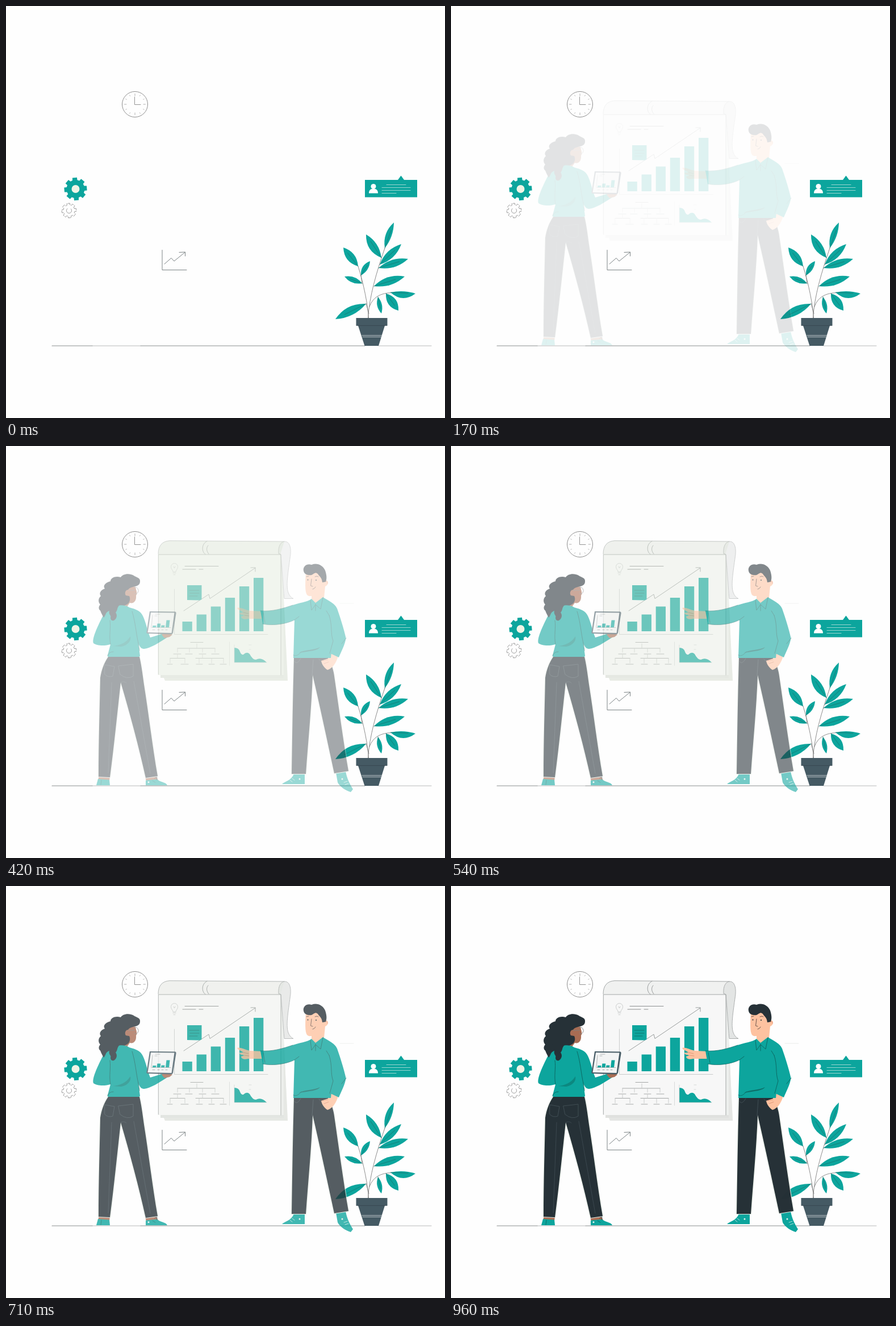
An HTML page with a canvas that plays this animation: 773 by 725 pixels, repeating every 1 s.

```html
<!DOCTYPE html>
<html lang="en">
<head>
<meta charset="utf-8">
<title>Team presentation</title>
<style>
html, body { margin: 0; width: 100%; height: 100%; overflow: hidden; background: #fefefe; }
canvas { display: block; }
</style>
</head>
<body>
<canvas id="stage" width="773" height="725"></canvas>
<script>
const W = 773, H = 725, LOOP = 1000, STEPS = 24;
const TEAL = '#0ca59d', DARK = '#253036', SLATE = '#455a64', GREY = '#8c8f90', PALE = '#c4c7c7';
const TAN = '#fec2a0', BROWN = '#a86b52', HALO = '#e2eae1', FOLD = '#0b625d';

const view = document.getElementById('stage').getContext('2d');
let g;

function layer(paint) {
  const c = document.createElement('canvas');
  c.width = W;
  c.height = H;
  g = c.getContext('2d');
  g.lineJoin = g.lineCap = 'round';
  paint();
  return c;
}
function fill(d, color) {
  g.fillStyle = color;
  g.fill(new Path2D(d));
}
function line(d, color = GREY, width = 1) {
  g.strokeStyle = color;
  g.lineWidth = width;
  g.stroke(new Path2D(d));
}
function dot(x, y, r, color) {
  g.fillStyle = color;
  g.beginPath();
  g.arc(x, y, r, 0, 7);
  g.fill();
}
function rect(x, y, w, h, color) {
  g.fillStyle = color;
  g.fillRect(x, y, w, h);
}
function dashes(y, spans, color, width) {
  for (const [a, b] of spans) line(`M${a} ${y}H${b}`, color, width);
}

function clock() {
  const x = 227, y = 173;
  line(`M${x - 22.5} ${y}a22.5 22.5 0 1 0 45 0a22.5 22.5 0 1 0 -45 0`, '#8e8e8e', 1);
  for (let k = 0; k < 12; k++) {
    const a = k * Math.PI / 6, c = Math.cos(a), s = Math.sin(a), r = k % 3 ? 17 : 15;
    line(`M${x + c * r} ${y + s * r}L${x + c * 18.5} ${y + s * 18.5}`, '#a0a0a0', 0.8);
  }
  line('M226.5 160V173.5H237', '#888', 0.9);
}

function gearPath(x, y, outer, inner, turn) {
  let d = '';
  for (let k = 0; k < 8; k++) {
    const parts = [[-0.27, inner], [-0.2, outer], [0.2, outer], [0.27, inner]];
    for (const [da, r] of parts) {
      const a = turn + k * Math.PI / 4 + da;
      d += `${d ? 'L' : 'M'}${x + r * Math.cos(a)} ${y + r * Math.sin(a)}`;
    }
  }
  return d + 'Z';
}
function gears() {
  fill(gearPath(122.5, 322, 20.3, 16, -0.08), TEAL);
  dot(122.5, 322, 7, '#f0f4e6');
  g.setLineDash([6, 2]);
  line(gearPath(111, 360, 13, 10, -0.1), '#929292', 0.9);
  g.setLineDash([]);
  line('M108 356.5a4.6 4.6 0 1 0 6.5 0.5', '#929292', 0.9);
}

function card() {
  fill('M632 306H690L695.5 298.5L701 306H724V336.5H632Z', TEAL);
  dot(647, 317.5, 4.5, '#fff');
  fill('M639 329.5C639 324 642 321.5 647 321.5S655 324 655 329.5Z', '#fff');
  const rows = [[670, 704, 314.5], [662, 712, 319.5], [662, 712, 324.5], [662, 687, 329.5]];
  for (const [a, b, y] of rows) line(`M${a} ${y}H${b}`, '#a9dcd6', 0.9);
}

// Base point, tip, and how far the left and right edges bow out.
const LEAVES = [
  [667, 426, 683, 381, 13, 8], [661, 443, 634, 402, 17, 12], [620, 458, 594, 425, 15, 14],
  [625, 474, 641, 449, 11, 8], [658, 455, 696, 419, 13, 13], [656, 461, 708, 445, 13, 13],
  [648, 493, 702, 476, 15, 13], [627, 488, 596, 476, 10, 10], [677, 504, 721, 506, 6, 18],
  [669, 506, 691, 536, 15, 15], [655, 512, 661, 541, 8, 9], [634, 524, 580, 551, 13, 17]
];
function plant() {
  line('M638.5 549C637 525 630 490 620 458M627 488L625 474', '#808080', 0.9);
  line('M637.5 549C640 510 652 470 667 426M640 529C646 513 658 505 680 504.5M634 524L639 541', '#808080', 0.9);
  for (const [x, y, tx, ty, l, r] of LEAVES) {
    const dx = tx - x, dy = ty - y, n = Math.hypot(dx, dy), mx = x + dx / 2, my = y + dy / 2;
    const nx = -dy / n, ny = dx / n;
    fill(`M${x} ${y}Q${mx - nx * l} ${my - ny * l} ${tx} ${ty}Q${mx + nx * r} ${my + ny * r} ${x} ${y}Z`, TEAL);
    line(`M${x} ${y}L${x + dx * 0.7} ${y + dy * 0.7}`, '#1c6f6a', 0.7);
  }
  fill('M619.5 561H667.5L656 598H631.5Z', SLATE);
  rect(616.5, 549, 55, 13, SLATE);
  line('M617 562.3H671', '#37474f', 0.9);
  line('M627 579.7H662M628 582.3H661', '#c9d0d2', 0.9);
}

function scenery() {
  rect(0, 0, W, H, '#fefefe');
  dashes(598, [[81, 152], [237, 632]], '#8c8f8f', 1.1);
  dashes(598, [[152, 237], [656, 749]], '#b8baba', 1);
  clock();
  gears();
  line('M275 429.5V464.5H318', '#7c8385', 1);
  line('M279 454L291 443.5L296 449L315 433.5M305 433.5L315.5 433V440', '#7c8385', 1);
  card();
  plant();
}

const SHEET = 'M268 190H484L489 268V403H268Z';
const ROLL = 'M268 191Q268 168 288 166.5L490 168L483 191Z';
const BACK = 'M484 200L489 268L496 413H280L278 408H272V402H484Z';
const CURL = 'M480 189C479 176 484 168 491 168C499 168 502 178 501 190C498 215 492 245 497 258Q500 266 506 268.5H490C488 245 486 215 484 191Z';

function paper() {
  for (const d of [BACK, SHEET, ROLL]) fill(d, '#edf3e8');
}

function orgChart() {
  const c = '#9b9e9e', w = 0.9;
  dashes(345.5, [[325, 347]], c, w);
  dashes(356, [[302, 368]], c, w);
  dashes(366, [[295, 308], [316, 328], [340, 352], [362, 375]], c, w);
  dashes(373.5, [[289, 315], [334, 383]], c, w);
  dashes(384, [[284, 293], [308, 321], [335, 346], [357, 367], [377, 388]], c, w);
  line('M336 348V356M302 356V363M323 356V363M346 356V363M368 356V363', PALE, w);
  line('M302 367V373M346 367V373M289 374V382M315 374V382M340 374V382M362 374V382M383 374V382', PALE, w);
}

function board() {
  fill(BACK, '#e5e6e4');
  rect(272, 402, 217, 6, '#e0e1df');
  fill('M268 190H484.5V403H268Z', '#f8f8f8');
  fill('M484 191L489 268V403H484Z', '#eeefee');
  fill(ROLL, '#f1f1f1');
  fill(CURL, '#e3e5e4');
  line('M268.3 402V191H484V403', '#979b9b', 0.9);
  line('M268 190Q268 168 288 166.7L490 168', '#979b9b', 0.9);
  line(CURL, '#a3a6a6', 0.9);
  line('M354 167.5C344 172 344 186 351 190.5M357 190C352 184 353 178 356 175', '#8c9090', 0.9);

  line('M294 221C294 218 290.5 217 290.5 212.5a6 6 0 0 1 12 0C302.5 217 299 218 299 221ZM294 223.5H299M295 226.5H298M295 212L296.5 215L298 212', PALE, 0.9);
  line('M315 211.5H374M311 217H334M340 217H347', GREY, 1);
  line('M313 290L357 261L359 268.5L439 214.5M431 214H439V221', '#8c9090', 0.9);
  fill('M319 245H344.5V270L341 271.5L319 271Z', TEAL);
  dashes(254, [[323, 340]], FOLD, 0.7);
  dashes(259, [[324, 340]], FOLD, 0.7);
  dashes(264, [[323, 337]], FOLD, 0.7);

  line('M296.5 252V331.5H461', PALE, 0.9);
  [309, 296.5, 282.5, 267, 247, 232].forEach((y, k) => rect(310.5 + k * 25.1, y, 17.3, 326 - y, TEAL));

  orgChart();
  line('M393.5 345V386', '#d4d6d6', 0.9);
  fill('M402 355Q410 355 412 362Q414 368 418 367Q424 361 429 366Q434 376 440 376Q450 371 459 381H402Z', TEAL);
  line('M402 350V381H459M428 350H432M428 358H431', PALE, 0.7);
}

function trousers(d) {
  line(d, HALO, 2);
  fill(d, DARK);
}

function woman() {
  // Feet and legs
  fill('M164 580L183 582L182 589L162 588Z', BROWN);
  fill('M245 582L264 580L268 588L247 590Z', BROWN);
  fill('M162 586L182 587.5L183 597H159Z', TEAL);
  fill('M246 588.5L266 586.5C272 592 282 591.5 284 597H246Z', TEAL);
  dot(251, 591.5, 1.5, '#e8f3f1');
  line('M262 585Q268 578 265 587', DARK, 0.9);
  line('M168 588L167 596M258 589L263 592', FOLD, 0.8);
  trousers('M180 371H235C238 383 240 398 243 420C251 470 258 530 267 581L246 584C234 530 218 470 202 416C196 470 190 530 183 583L163 582C163 520 165 460 166 408C168 395 172 383 180 371Z');
  line('M174 385L191 388L188 405Q180 408 174 402ZM198 387L224 384V405Q213 412 201 402Z', '#46535a', 0.8);
  line('M186 416L180 575M225 414L254 576M202 416Q208 413 212 417', '#3f4c53', 0.8);

  // Head
  fill('M208 250C216 246 224 247 228 248C229 254 232 260 229 263C230 272 225 278 218 276L213 283L205 279Z', BROWN);
  fill('M236 239C237 231 228 231 225 228C217 223 205 225 202 231C193 228 184 232 184 238C175 240 170 246 174 251C167 253 163 259 167 264C162 268 162 275 166 279C161 284 164 291 170 291C173 291 177 288 180 285L196 281C203 283 210 281 214 278C219 274 219 268 217 264L211 263C208 258 211 253 215 253C220 245 235 250 236 239Z', DARK);
  line('M215 254H226M226 250a4.5 5.5 0 1 1 0 9', '#7e7f80', 0.9);

  // Shirt, with the loose curls over it
  fill('M188 284C196 279 210 279 217 284C228 287 237 290 241 299C247 312 249 325 254 337L277 330L285 336C270 346 254 356 243 357C238 357 235 353 233 347L236 369Q236 371 232 371H181Q178 371 179 368L184 349C175 352 160 352 154 347C151 340 160 320 169 302C174 293 180 287 188 284Z', TEAL);
  fill('M166 278C164 290 168 294 172 302C176 298 175 292 182 290C180 297 186 298 184 302C184 307 188 308 190 307C196 303 196 297 193 293C197 289 195 284 200 280Z', DARK);
  fill('M188 352C201 351 212 346 219 335C221 343 214 351 203 353Z', '#0b8880');
  line('M183 307C185 320 181 334 184 349M222 291C228 310 229 330 233 347M179 369Q181 362 189 362M233 347L235 360', FOLD, 0.9);

  // Tablet and hand
  fill('M274 332C280 328 290 330 293 332L288 336L279 338Z', BROWN);
  fill('M253 291L298 291.5Q300 292 299.5 295L294 329Q293 331.5 290 331.5L249 330Q247 330 247.5 327Z', SLATE);
  fill('M255 293L296.5 293.5L291.5 329L249.5 328Z', '#f3f4f4');
  [[258, 3.5], [265.5, 7], [273, 4], [281, 13]].forEach(([x, h]) =>
    fill(`M${x} 319.5l${h * 0.12} ${-h}h6l${-h * 0.12} ${h}Z`, TEAL));
  line('M258 298L256 319.5H290M263 296H271M262 299H266', '#a1a5a5', 0.8);
  line('M258 323.5H262M267 323.5H270M274 323.5H277M281 323.5H284', GREY, 0.8);
}

function man() {
  // Feet and legs
  fill('M507 577H526L526 595H486C491 590 502 589 507 577Z', TEAL);
  fill('M581 575L598 572C600 585 606 596 611 604L607 609C598 606 588 600 584 592Z', TEAL);
  dot(517, 586, 1.5, '#e8f3f1');
  dot(592, 586, 1.5, '#e8f3f1');
  line('M500 588L504 591M504 585L508 588M595 592L601 590M597 596L603 594', '#d4ecea', 0.8);
  trousers('M507 373H569C573 385 577 395 578 405C586 460 594 520 603 572L578 576C566 520 552 455 540 403C538 460 532 520 528 577L503 577C504 510 505 440 507 373Z');
  line('M541 376Q540 390 539 404M508 379Q512 386 519 374M560 376Q556 383 551 375', '#46535a', 0.8);

  // Head
  fill('M528 220C527 240 526 256 530 262C533 265 536 264 538 264L538 276Q546 281 552 275L560 267L562 247C568 245 569 237 563 236L556 222Z', TAN);
  fill('M524 220C522 211 531 206 538 209C548 205 558 210 562 219C565 228 565 234 563 239L557 240C556 231 552 230 549 225C544 221 543 225 538 227C530 228 525 225 524 220Z', DARK);
  line('M538 234L536.5 246L540 247M540 252Q544 251 545 248M529 230L533 229M544 230Q547 228 550 230', '#5d4a42', 0.9);
  dot(531.5, 235.5, 1.1, DARK);
  dot(546, 236, 1.1, DARK);
  line('M563 239Q567 237 566 242', '#d98f70', 0.8);

  // Hands
  fill('M452 291L430 290C421 288 414 284 408 284.5C405 287 413 289 418 293L411 293.5C411 297 416 297 420 298L414 300C414 304 420 306 426 304L451 304Z', TAN);
  line('M418 293L427 295M420 298L428 299', '#d98f70', 0.8);
  fill('M568 362L585 369C582 382 574 392 566 394C560 390 556 384 555 378L567 374Z', TAN);
  line('M556 378L567 376M560 383L568 380', '#d98f70', 0.8);

  // Shirt
  fill('M538 269L545 276L558 266C569 273 579 277 583 286C589 303 595 322 598.5 338C597 350 590 362 586 372L569 364L575 344L572 373H506L508 306C495 313 470 317 452 313L448 290C470 292 490 285 505 280C515 276 530 275 538 269Z', TEAL);
  line('M452 313C470 317 495 313 508 306M448 290C470 292 490 285 505 280', FOLD, 0.7);
  line('M536 272L538 289L545 279M558 267L554 287L545 279M545 279V290', FOLD, 0.9);
  line('M569 298C575 315 571 330 576 343L570 365M564 290L569 298M508 306L516 300M599 338L591 348', FOLD, 0.9);
  line('M453 293L456 311', FOLD, 0.8);
  fill('M516 364C526 358 540 360 553 354C549 360 535 361 516 364Z', '#0b6f69');
  line('M506 368Q512 372 520 362', FOLD, 0.8);
  line('M588 277H612', '#e3e5e4', 0.8);
}

const back = layer(scenery), tint = layer(paper), chart = layer(board);
const people = layer(() => { woman(); man(); });

function fade(step) {
  const p = step / 23.3;
  return (p + p * p * (3 - 2 * p)) / 2;
}

function draw() {
  // Steps begin on times rounded to 10 ms, up to 3.4 ms early.
  const t = (performance.now() - start) % LOOP + 3.4;
  const step = Math.min(STEPS - 1, Math.floor(t * STEPS / LOOP));
  view.globalAlpha = 1;
  view.drawImage(back, 0, 0);
  if (step > 5) view.drawImage(tint, 0, 0);
  view.globalAlpha = fade(step);
  view.drawImage(chart, 0, 0);
  view.drawImage(people, 0, 0);
  requestAnimationFrame(draw);
}

const start = performance.now();
draw();
</script>
</body>
</html>
```
